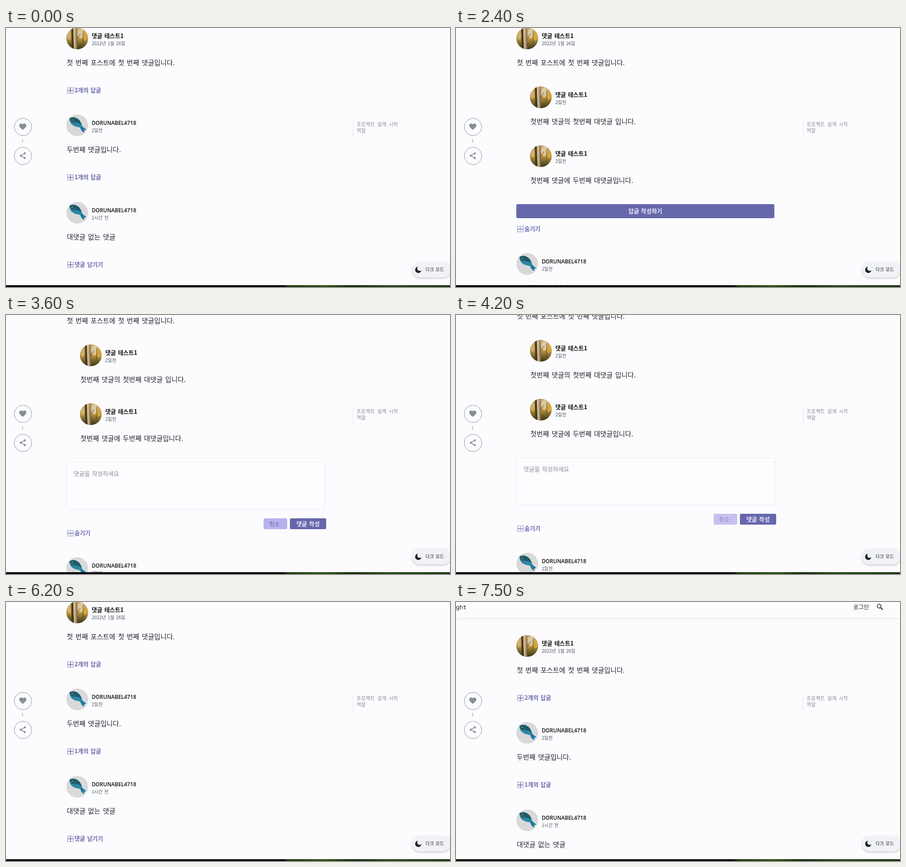
An HTML page for the animation above (7.6 s loop, 979 px wide and 572 px high).

```html
<!DOCTYPE html>
<html lang="ko">
<head>
<meta charset="utf-8">
<title>댓글</title>
<style>
html, body { margin: 0; width: 100%; height: 100%; overflow: hidden; background: #fcfcff; }
body { position: relative; font-family: "Noto Sans CJK KR", "Noto Sans CJK JP", "Noto Sans CJK", sans-serif; color: #212529; word-spacing: 1px; }
div, svg, span { position: absolute; }
span { line-height: 20px; white-space: pre; }
#page, #open, #closed, #rest, #editor, #reply { left: 0; top: 0; width: 979px; height: 0; }

.name { font-size: 12.7px; font-weight: 700; color: #111; }
.user { font: 600 11.7px/20px "Open Sans", "Noto Sans", sans-serif; color: #111; }
.date { font-size: 10px; color: #495057; }
.body { font-size: 14.9px; word-spacing: 1.5px; }
.link { color: #6667ab; width: 90px; height: 20px; }
.link span { left: 18px; top: -1px; font-size: 12.7px; font-weight: 700; }
.link svg { left: 2px; top: 3px; }
.btn { border-radius: 3px; font-size: 12.7px; font-weight: 700; text-align: center; background: #6667ab; color: #ececff; }
.btn span { position: static; display: block; }
#cancel { background: #b8b2ec; color: #6667ab; font-weight: 500; }
#box { left: 133px; top: 389px; width: 569px; height: 103px; border: 1px solid #e8e8f1; border-radius: 3px; background: #fdfdff; }
.hint { font-size: 13px; color: #868e96; }

#head { left: 0; top: 0; width: 979px; height: 35px; background: #fcfcff; box-shadow: 0 1px 6px rgba(0,0,0,.1); }
.ring { left: 17.5px; width: 37px; height: 37px; border: 1px solid #868e96; border-radius: 50%; }
.ring svg { left: 9.5px; top: 9.5px; }
.toc { font-size: 11px; word-spacing: 2px; color: #868e96; }
#mode { left: 895px; top: 516px; width: 86px; height: 35px; border-radius: 18px; background: #f1f2f5; box-shadow: 0 2px 4px rgba(0,0,0,.2); }
#strip { left: 0; top: 568px; width: 979px; height: 4px; background: linear-gradient(90deg, #050608 62.5%, #1d3a0c 63.5%, #2c5012 72%, #14290a 78%, #24471a 86%, #1a3510); }

#page, #closed, #open, #reply, #editor, #rest, #head, #user2, #more, #hide, #submit, #cancel { animation: 7.6s step-end infinite; }
#page { animation-name: scroll; }
#closed { animation-name: closed; }
#open { animation-name: open; }
#reply { animation-name: reply; }
#editor { animation-name: editor; }
#rest { animation-name: push; }
#head { animation-name: head; }
#user2 { animation-name: user; }
#more { animation-name: more; }
#hide { animation-name: hide; }
#submit { animation-name: submit; }
#cancel { animation-name: cancel; }

@keyframes scroll {
  0% { transform: translateY(0); }
  46.05% { transform: translateY(-10px); }
  47.36% { transform: translateY(-64px); }
  48.68% { transform: translateY(-74px); }
  81.57% { transform: translateY(0); }
  85.52% { transform: translateY(10px); }
  86.84% { transform: translateY(64px); }
  88.15%, 100% { transform: translateY(74px); }
}
@keyframes closed { 0%, 81.57%, 100% { opacity: 1; } 17.1% { opacity: 0; } }
@keyframes open { 0%, 81.57%, 100% { opacity: 0; } 17.1% { opacity: 1; } }
@keyframes reply { 0%, 64.47%, 100% { opacity: 1; } 38.15% { opacity: 0; } }
@keyframes editor { 0%, 64.47%, 100% { opacity: 0; } 38.15% { opacity: 1; } }
@keyframes push { 0%, 64.47%, 100% { transform: translateY(0); } 38.15% { transform: translateY(102px); } }
@keyframes head { 0% { opacity: 0; } 82.89%, 100% { opacity: 1; } }
@keyframes user { 0%, 6.57%, 92.1%, 100% { opacity: 1; } 5.26%, 90.78% { opacity: .7; } }
@keyframes more { 0%, 17.1%, 100% { opacity: 1; } 9.21% { opacity: .75; } }
@keyframes hide { 0%, 52.63%, 81.57%, 100% { opacity: 1; } 51.31%, 71.05% { opacity: .75; } }
@keyframes submit { 0%, 55.26%, 100% { opacity: 1; } 53.94% { opacity: .8; } }
@keyframes cancel { 0%, 64.47%, 100% { opacity: 1; } 55.26% { opacity: .8; } }
</style>
</head>
<body>
<svg width="0" height="0">
  <defs>
    <clipPath id="disc"><circle cx="24" cy="24" r="24"/></clipPath>
    <linearGradient id="wood" x2="0" y2="1">
      <stop offset="0" stop-color="#c8a668"/><stop offset=".5" stop-color="#bd943f"/>
      <stop offset=".72" stop-color="#7c6a2c"/><stop offset="1" stop-color="#3a3314"/>
    </linearGradient>
    <linearGradient id="bark">
      <stop offset="0" stop-color="#e0d2b8"/><stop offset=".5" stop-color="#b59c7a"/><stop offset="1" stop-color="#5c452a"/>
    </linearGradient>
    <g id="forest" clip-path="url(#disc)">
      <path fill="url(#wood)" d="M0 0h48v48H0z"/>
      <ellipse cx="32" cy="13" rx="7" ry="11" fill="#e4dcc4" opacity=".7"/>
      <ellipse cx="42" cy="19" rx="6" ry="10" fill="#d9a840" opacity=".8"/>
      <ellipse cx="6" cy="18" rx="4" ry="9" fill="#d8c08a" opacity=".6"/>
      <path fill="#43361c" d="M11 0h4l1 48h-4z"/>
      <path fill="url(#bark)" d="M16 0h7l2 48h-8z"/>
      <path fill="none" stroke="#5a4425" d="M24 25l7-11M37 8v28"/>
    </g>
    <g id="fish">
      <circle cx="24" cy="24" r="24" fill="#d9d9d9"/>
      <path fill="#2b87a6" d="M7 9C13 4 23 6 29 13 33 18 34 23 36 28L33 31C29 27 24 28 19 26 11 23 7 17 7 9z"/>
      <path fill="#1b5c6c" d="M7 9C13 4 23 6 29 13 31 16 33 19 34 23 28 19 23 17 18 19 12 18 8 15 7 9z"/>
      <path fill="#2079a0" d="M35 26C38 29 41 30 44 34 40 34 38 35 40 40 35 38 32 35 31 29z"/>
      <circle cx="13" cy="12" r="1.400" fill="#b98a4a"/>
      <path fill="none" stroke="#b98a4a" d="M17 15l3 4"/>
    </g>
  </defs>
</svg>

<div id="page"></div>

<div class="ring" style="top:198.500px"><svg width="18" height="18" viewBox="0 0 24 24" fill="#868e96"><path d="M12 21.400C5 15.400 1.500 12.300 1.500 8.300 1.500 5 4 2.600 7.200 2.600c1.900 0 3.700.9 4.800 2.400 1.100-1.500 2.900-2.400 4.800-2.400C20 2.600 22.500 5 22.500 8.300c0 4-3.500 7.100-10.500 13.100z"/></svg></div>
<div class="ring" style="top:262.500px"><svg width="18" height="18" viewBox="0 0 24 24" fill="#868e96"><path stroke="#868e96" stroke-width="2" fill="none" d="M18 5L6 12l12 7"/><circle cx="18" cy="5" r="3"/><circle cx="6" cy="12" r="3"/><circle cx="18" cy="19" r="3"/></svg></div>
<span style="left:34px;top:239px;font-size:9px;color:#868e96">1</span>

<div style="left:765px;top:202px;width:1px;height:40px;background:#dee2e6"></div>
<span class="toc" style="left:773px;top:202px">프로젝트 설계 시작</span>
<span class="toc" style="left:773px;top:216px">역할</span>

<div id="head">
  <span style="left:0;top:1px;font:13px/20px 'Noto Sans Mono','DejaVu Sans Mono',monospace">ght</span>
  <span style="left:876px;top:1px;font-size:12.5px">로그인</span>
  <svg style="left:928px;top:4px" width="14" height="14" fill="none" stroke="#212529" stroke-width="1.6"><circle cx="5.2" cy="5.2" r="4.2"/><path stroke-width="2" d="M8.500 8.500l4.700 4.700"/></svg>
</div>

<div id="mode">
  <svg style="left:7px;top:11px" width="14" height="14" fill="#212529"><path d="M6.500 0A7 7 0 1 0 14 8 4.800 4.800 0 0 1 6.500 0z"/></svg>
  <span style="left:30px;top:7px;font-size:10px">다크 모드</span>
</div>
<div id="strip"></div>

<script>
const text = (cls, x, y, s, id = '') =>
  `<span class="${cls}" id="${id}" style="left:${x}px;top:${y - 11}px">${s}</span>`;

// 9x9 cell icon: dotted frame with a cross, or a single bar with a dotted middle
function icon(cross) {
  let d = 'M0 4h9v1H0z' + (cross ? 'M4 0h1v9H4z' : '');
  for (let i = 0; i < 9; i += 2)
    for (let j = 0; j < 9; j += 2)
      if (i % 8 == 0 || j % 8 == 0 || (!cross && i == 4)) d += `M${i} ${j}h1v1h-1z`;
  return `<svg width="14" height="14" viewBox="0 0 9 9" fill="currentColor"><path d="${d}"/></svg>`;
}

const link = (y, s, cross = true, id = '') =>
  `<div class="link" id="${id}" style="left:133px;top:${y - 10}px">${icon(cross)}<span>${s}</span></div>`;

const button = (id, x, y, w, h, s) =>
  `<div class="btn" id="${id}" style="left:${x}px;top:${y}px;width:${w}px;height:${h}px"><span style="line-height:${h - 1}px">${s}</span></div>`;

function comment(x, y, pic, date, body, id) {
  const guest = pic == 'forest';
  return `<svg style="left:${x}px;top:${y}px" width="48" height="48"><use href="#${pic}"/></svg>`
    + text(guest ? 'name' : 'user', x + 56, y + 19, guest ? '댓글 테스트1' : 'DORUNABEL4718', id)
    + text('date', x + 56, y + 36, date)
    + text('body', x + 1, y + 78, body);
}

const second = '두번째 댓글입니다.';

document.getElementById('page').innerHTML =
  comment(133, -1, 'forest', '2022년 1월 26일', '첫 번째 포스트에 첫 번째 댓글입니다.')
  + '<div id="closed">'
  + link(138, '2개의 답글', true, 'more')
  + comment(133, 191, 'fish', '2일전', second, 'user2')
  + link(330, '1개의 답글')
  + comment(133, 383.5, 'fish', '1시간 전', '대댓글 없는 댓글')
  + link(522.5, '댓글 남기기')
  + '</div><div id="open">'
  + comment(163, 129, 'forest', '2일전', '첫번째 댓글의 첫번째 대댓글 입니다.')
  + comment(163, 259, 'forest', '2일전', '첫번째 댓글에 두번째 대댓글입니다.')
  + '<div id="reply">' + button('', 133, 389, 569, 31, '답글 작성하기') + '</div>'
  + '<div id="editor"><div id="box"></div>'
  + text('hint', 149, 414.5, '댓글을 작성하세요')
  + button('cancel', 568, 513, 52, 24, '취소&nbsp;')
  + button('submit', 626, 513, 80, 24, '댓글 작성')
  + '</div><div id="rest">'
  + link(444, '숨기기', false, 'hide')
  + comment(133, 497, 'fish', '2일전', second)
  + comment(163, 627, 'forest', '2일전', '두번째 댓글의 대댓글입니다.')
  + '</div></div>';
</script>
</body>
</html>
```
